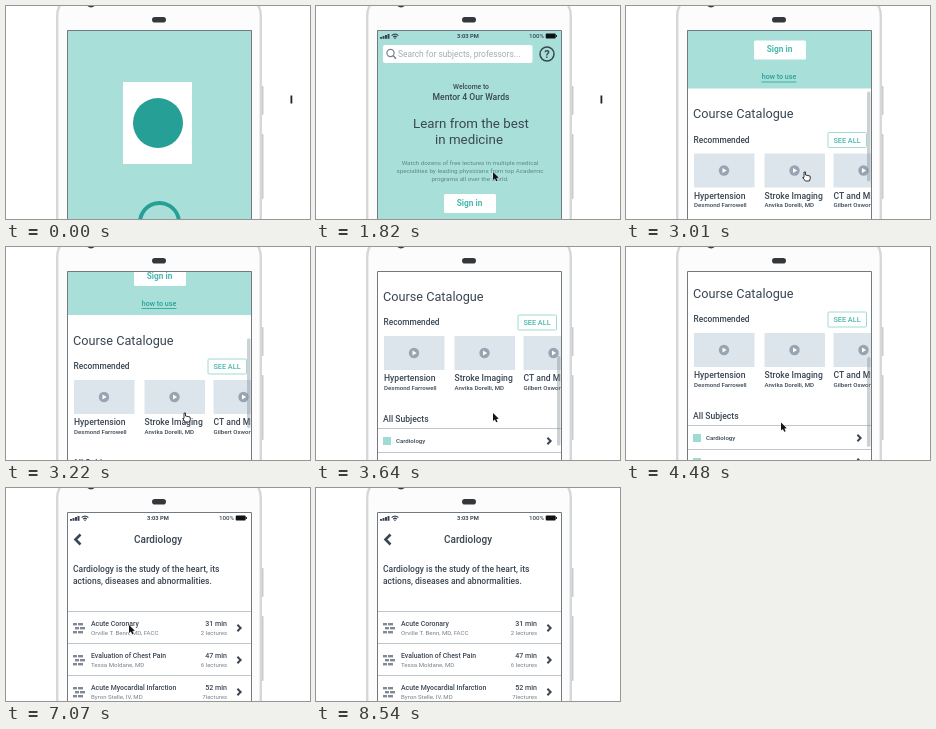
An HTML page with a canvas that plays this animation: 304 by 213 pixels, repeating every 8750 ms.

```html
<!DOCTYPE html>
<html lang="en">
<head>
<meta charset="utf-8">
<title>Course app walkthrough</title>
<style>
  html, body { margin: 0; width: 100%; height: 100%; overflow: hidden; background: #fff; }
  canvas { display: block; width: 304px; height: 213px; }
</style>
</head>
<body>
<canvas id="stage"></canvas>
<script>
const W = 304, H = 213, LOOP = 8750, STEP = 70;
const INK = '#3a4653', TEAL = '#a8e0d9', DEEP = '#26a096', ACCENT = '#4ab8ad';
const GREY = '#76818b', MIST = '#dde5ec', RULE = '#bfc5ca';
const canvas = document.getElementById('stage');
const ctx = canvas.getContext('2d');
const ratio = window.devicePixelRatio || 1;
canvas.width = W * ratio;
canvas.height = H * ratio;

// Keys are [time, value, value...]; values are interpolated between them.
function track(keys, t) {
  if (t <= keys[0][0]) return keys[0].slice(1);
  for (let i = 1; i < keys.length; i++) {
    const a = keys[i - 1], b = keys[i];
    if (t <= b[0]) {
      const k = (t - a[0]) / (b[0] - a[0]);
      return a.slice(1).map((v, j) => v + (b[j + 1] - v) * k);
    }
  }
  return keys[keys.length - 1].slice(1);
}

const scrollKeys = [
  [1890, 0], [2030, 15], [2240, 77], [2380, 134], [2450, 150], [2940, 150],
  [3080, 157], [3220, 168], [3430, 195], [3640, 212], [3780, 215]
];
const pointerKeys = [
  [1330, 284, 89], [1400, 268, 101], [1540, 212, 143], [1680, 177, 166],
  [4200, 177, 166], [4340, 170, 169], [4620, 140, 182], [4830, 130, 187],
  [6440, 130, 187], [6720, 144, 165], [6930, 130, 143], [7070, 123, 137],
  [7350, 123, 137], [7560, 100, 108], [7770, 82, 91],
  [7840, 82, 91], [8120, 88, 122], [8400, 98, 149]
];
const tailKeys = [[140, 165], [420, 380]];

function rect(x, y, w, h, fill, r = 0) {
  ctx.fillStyle = fill;
  ctx.beginPath();
  ctx.roundRect(x, y, w, h, r);
  ctx.fill();
}

function frame(x, y, w, h, color, r = 0, width = 1) {
  ctx.strokeStyle = color;
  ctx.lineWidth = width;
  ctx.beginPath();
  ctx.roundRect(x, y, w, h, r);
  ctx.stroke();
}

function disc(x, y, r, fill) {
  ctx.fillStyle = fill;
  ctx.beginPath();
  ctx.arc(x, y, r, 0, Math.PI * 2);
  ctx.fill();
}

function line(points, color, width = 1) {
  ctx.strokeStyle = color;
  ctx.lineWidth = width;
  ctx.beginPath();
  points.forEach(([x, y]) => ctx.lineTo(x, y));
  ctx.stroke();
}

function arc(x, y, r, from, to, color, width) {
  ctx.strokeStyle = color;
  ctx.lineWidth = width;
  ctx.beginPath();
  ctx.arc(x, y, r, from * Math.PI / 180, to * Math.PI / 180);
  ctx.stroke();
}

function text(str, x, y, size, color = INK, align = 'left', weight = 500) {
  ctx.font = `${weight} ${size}px Roboto, sans-serif`;
  ctx.textAlign = align;
  ctx.textBaseline = 'middle';
  ctx.fillStyle = color;
  ctx.fillText(str, x, y + 0.5);
}

function chevron(x, y, size, dir = 1, width = 2) {
  line([[x - dir * size / 2, y - size], [x + dir * size / 2, y], [x - dir * size / 2, y + size]], INK, width);
}

function statusBar() {
  for (let i = 0; i < 4; i++) rect(64 + i * 2.5, 31 - i, 2, 1.8 + i, INK);
  arc(79, 33, 4.8, 225, 315, INK, 1.2);
  arc(79, 33, 2.6, 225, 315, INK, 1.2);
  disc(79, 32.2, 0.8, INK);
  text('3:03 PM', 152, 30, 5.8, INK, 'center', 700);
  text('100%', 228, 30, 6.2, INK, 'right');
  rect(229.7, 27.5, 10, 5, '#111', 1);
  rect(240, 29, 0.9, 2, '#111');
}

function splash(t) {
  rect(61, 24, 185, 190, TEAL);
  rect(117, 76, 69, 82, '#fff');
  disc(152, 117, 25, DEEP);
  const tail = track(tailKeys, t)[0];
  const head = t < STEP ? 350 : 380;
  if (tail < head) arc(153.5, 216.5, 19.5, tail, head, DEEP, 4);
}

function hero() {
  rect(61, 24, 185, 212, TEAL);
  statusBar();
  rect(67, 39, 149.5, 18, '#fff', 2);
  arc(74.5, 47, 3.6, 0, 360, GREY, 1.2);
  line([[77, 49.6], [80, 52.8]], GREY, 1.4);
  text('Search for subjects, professors...', 82, 48, 8.4, '#a3adb5', 'left', 400);
  arc(231, 48, 7, 0, 360, INK, 1.5);
  text('?', 231, 48, 11, INK, 'center', 700);
  text('Welcome to', 155, 80, 6.8, INK, 'center');
  text('Mentor 4 Our Wards', 155, 91, 8.6, INK, 'center');
  text('Learn from the best', 155, 117.5, 13.3, INK, 'center', 400);
  text('in medicine', 153, 134, 13.3, INK, 'center', 400);
  [
    'Watch dozens of free lectures in multiple medical',
    'specialities by leading physicians from top Academic',
    'programs all over the world.'
  ].forEach((s, i) => text(s, 154, 156.5 + i * 8.2, 6.25, '#5f8488', 'center', 400));
  rect(128, 188, 52, 19, '#fff', 1.5);
  text('Sign in', 153.5, 197, 8.3, ACCENT, 'center', 700);
  text('how to use', 153, 224, 7.1, DEEP, 'center');
  line([[135.5, 229.5], [170.5, 229.5]], DEEP, 0.8);
}

function lecture(x, title, name) {
  rect(x, 301, 60.5, 34, MIST);
  disc(x + 30, 318, 5.2, '#98a4b1');
  ctx.fillStyle = '#fff';
  ctx.beginPath();
  ctx.moveTo(x + 28.5, 315.5);
  ctx.lineTo(x + 32.7, 318);
  ctx.lineTo(x + 28.5, 320.5);
  ctx.fill();
  text(title, x, 343, 8.6);
  text(name, x, 352.5, 6.1);
}

function subject(y, name) {
  line([[61, y - 12.5], [246, y - 12.5]], RULE);
  rect(67, y - 4, 8, 8, '#9edbd3');
  text(name, 80, y, 6.1);
  chevron(233, y, 3.2);
}

function home(t, scroll) {
  ctx.save();
  ctx.translate(0, -scroll);
  hero();
  text('Course Catalogue', 67, 261.5, 12.7, INK, 'left', 400);
  text('Recommended', 67.5, 287.5, 8.3);
  frame(202, 280, 38.5, 15, '#9edbd3', 1);
  text('SEE ALL', 221, 287.5, 7.3, ACCENT, 'center');
  lecture(68, 'Hypertension', 'Desmond Farrowell');
  lecture(138.5, 'Stroke Imaging', 'Anvika Dorelli, MD');
  lecture(207.5, 'CT and MRI', 'Gilbert Oxworth');
  text('All Subjects', 67, 384, 8.6);
  subject(406, 'Cardiology');
  subject(430, 'Emergency Medicine');
  ctx.restore();

  let alpha = t < 1960 ? 0 : 1;
  if (t >= 2660 && t < 3010) alpha = Math.max(0, 1 - (t - 2590) / 280);
  ctx.globalAlpha = alpha * 0.4;
  rect(241, 24 + scroll * 0.4, 3.5, 90, '#7f8c92', 1.7);
  ctx.globalAlpha = 1;
}

function talk(y, title, name, time, count) {
  line([[61, y - 16.5], [246, y - 16.5]], RULE);
  [0, 2, 0].forEach((dx, i) => {
    const top = y - 5 + i * 4;
    rect(67 + dx, top, 4, 2.4, '#7f8a95');
    rect(72 + dx, top, 5, 2.4, '#7f8a95');
  });
  text(title, 85, y - 4.5, 6.9);
  text(name, 85, y + 4.5, 6.1, GREY, 'left', 400);
  text(time, 221, y - 4.5, 7.1, INK, 'right');
  text(count, 221, y + 4.5, 6, GREY, 'right', 400);
  chevron(233, y, 3.2);
}

function detail() {
  statusBar();
  chevron(72, 51.5, 5, -1, 2.6);
  text('Cardiology', 152, 51.7, 10, INK, 'center');
  text('Cardiology is the study of the heart, its', 67, 81.3, 8.5);
  text('actions, diseases and abnormalities.', 67, 93.3, 8.5);
  [
    ['Acute Coronary', 'Orville T. Benn, MD, FACC', '31 min', '2 lectures'],
    ['Evaluation of Chest Pain', 'Tessa Moldane, MD', '47 min', '6 lectures'],
    ['Acute Myocardial Infarction', 'Byron Stelle, IV, MD', '52 min', '7lectures']
  ].forEach((row, i) => talk(140 + i * 32, ...row));
}

function phone() {
  rect(0, 0, W, H, '#fff');
  rect(255, 80, 2.5, 29, '#c9cbcd', 1);
  rect(255, 128, 2.5, 65, '#c9cbcd', 1);
  rect(50, -14, 206, 260, '#fcfcfc', 24);
  frame(51.2, -13, 203.6, 260, '#d6d7d9', 23, 2.4);
  disc(85, -3.5, 5, '#3a3d42');
  rect(146, 11, 14, 5.6, '#34373b', 2.8);
  rect(61, 24, 185, 190, '#fff');
}

function arrow(x, y) {
  ctx.fillStyle = '#151515';
  ctx.strokeStyle = '#fff';
  ctx.lineWidth = 0.7;
  ctx.beginPath();
  [[0, 0], [0, 8], [1.9, 6.4], [3.2, 9.3], [4.6, 8.7], [3.4, 5.9], [5.8, 5.7]]
    .forEach(([dx, dy]) => ctx.lineTo(x + dx, y + dy));
  ctx.closePath();
  ctx.stroke();
  ctx.fill();
}

function hand(x, y) {
  ctx.beginPath();
  [[0, 0], [1.5, 0], [1.5, 3], [6, 4], [6.4, 6], [5.4, 9], [1.4, 9], [-1.3, 5.6], [0, 5.4]]
    .forEach(([dx, dy]) => ctx.lineTo(x + dx + 1, y + dy));
  ctx.closePath();
  ctx.fillStyle = '#fff';
  ctx.fill();
  ctx.strokeStyle = '#222';
  ctx.lineWidth = 0.9;
  ctx.stroke();
}

function pointer(t, scroll) {
  // A sliver of the resting pointer stays at the right edge.
  if (t < 2660) rect(284.5, 89.5, 1.8, 8, '#222');
  if (t < 1400 || t >= 8540) return;
  const [x, y] = track(pointerKeys, t);
  const overCard = t < 4270 && scroll > 135 && scroll < 191;
  const overRow = t > 4270 && t < 5810 && y > 178;
  (overCard || overRow ? hand : arrow)(x, y);
}

function draw(t) {
  const scroll = track(scrollKeys, t)[0];
  ctx.setTransform(ratio, 0, 0, ratio, 0, 0);
  phone();
  ctx.save();
  ctx.beginPath();
  ctx.rect(61, 24, 185, 190);
  ctx.clip();
  if (t < 560) splash(t);
  else if (t < 5950) home(t, scroll);
  else detail();
  ctx.restore();
  frame(61.5, 24.5, 184, 200, '#737a7f');
  pointer(t, scroll);
}

function tick(now) {
  draw(Math.floor((now % LOOP) / STEP) * STEP);
  requestAnimationFrame(tick);
}
draw(0);
requestAnimationFrame(tick);
</script>
</body>
</html>
```
